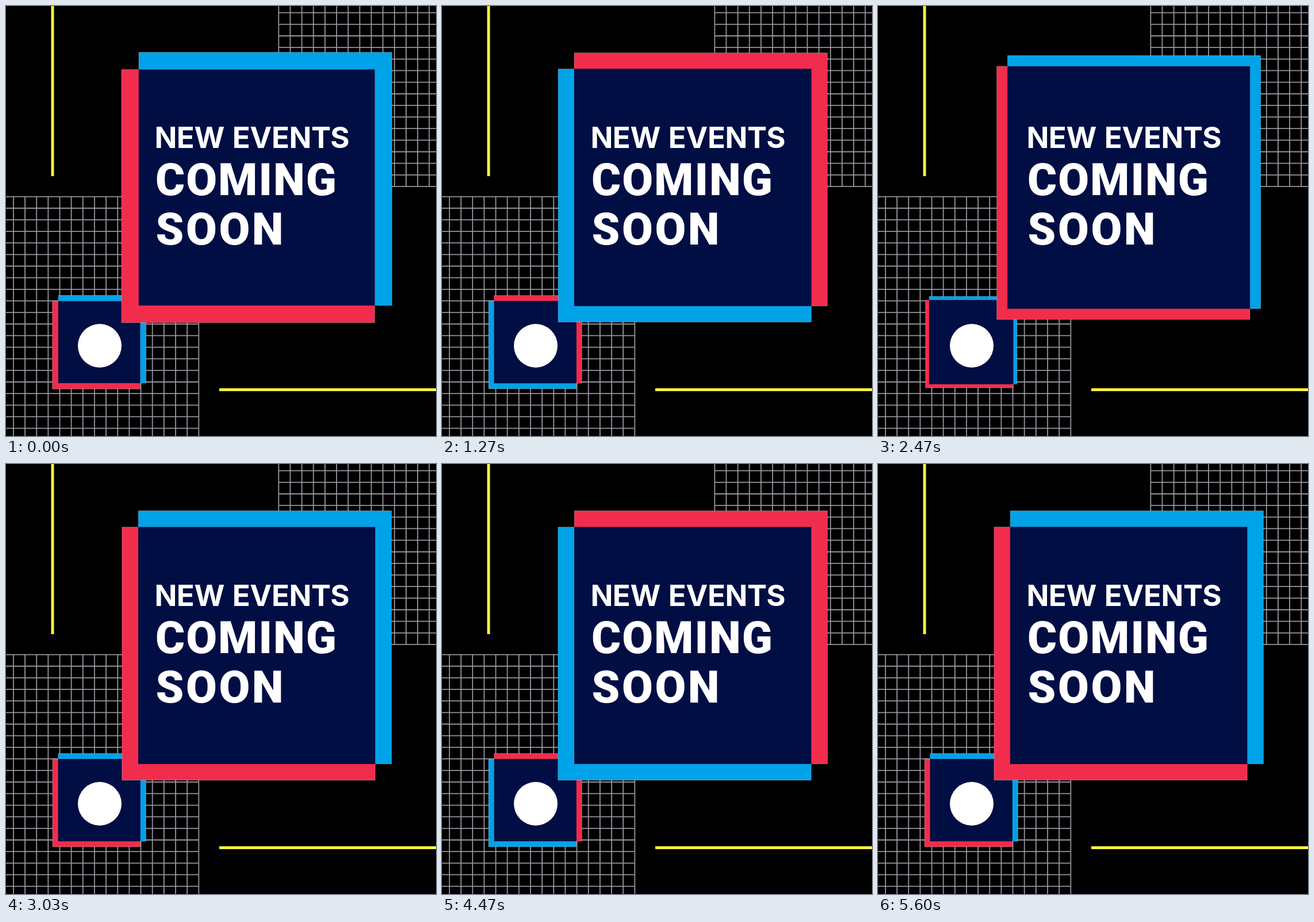
These frames come from a looping animation (748x748 px, 5660 ms). An HTML page:

```html
<!DOCTYPE html>
<html lang="en">
<head>
<meta charset="utf-8">
<title>New events coming soon</title>
<style>
  html, body { margin: 0; width: 100%; height: 100%; overflow: hidden; background: #000; }
  svg { display: block; width: 100%; height: 100%; }
  .grid { fill: none; stroke: #98939d; stroke-width: 1.8; }
  .blue, .red { stroke: #fff; stroke-opacity: .3; stroke-width: 1; }
  .blue { fill: #00a2e8; }
  .red { fill: #f22c4c; }
  .overlap { fill: #000e44; }
  .bar { fill: #fff340; }
  text { fill: #fff; }
  .small { font: 700 51px Inter, sans-serif; letter-spacing: -.4px; word-spacing: 2px; }
  .large { font: 900 78px Roboto, sans-serif; }
</style>
</head>
<body>
<svg viewBox="0 0 748 748">
  <path class="grid" id="gridTop"/>
  <path class="grid" id="gridBottom"/>
  <rect class="bar" x="78.5" y="0" width="5" height="296"/>
  <rect class="bar" x="371" y="665" width="377" height="5"/>
  <g id="smallCard"></g>
  <circle cx="163" cy="591" r="38" fill="#fff"/>
  <g id="bigCard"></g>
  <text class="small" x="258.4" y="246.5">NEW EVENTS</text>
  <text class="large" x="260" y="329" letter-spacing="2">COMING</text>
  <text class="large" x="260.5" y="415" letter-spacing="3.6">SOON</text>
</svg>
<script>
const LOOP = 5660, SWING = 2880, REACH = 15;
const CELL = 20.15;

function drawGrid(id, left, top, right, bottom, firstX, firstY) {
  let d = '';
  for (let x = firstX; x <= right + 1; x += CELL) d += `M${x} ${top}V${bottom}`;
  for (let y = firstY; y <= bottom + 1; y += CELL) d += `M${left} ${y}H${right}`;
  document.getElementById(id).setAttribute('d', d);
}
drawGrid('gridTop', 473.5, 0, 748, 314.5, 474.3, 11.7);
drawGrid('gridBottom', 0, 331, 335.5, 748, 12.9, 331.6);

function makeCard(id, cx, cy, size) {
  const group = document.getElementById(id);
  const [blue, red, overlap] = ['blue', 'red', 'overlap'].map(name => {
    const rect = document.createElementNS('http://www.w3.org/2000/svg', 'rect');
    rect.setAttribute('class', name);
    return group.appendChild(rect);
  });
  const place = (rect, x, y, side) => {
    const box = { x: x - side / 2, y: y - side / 2, width: side, height: side };
    for (const key in box) rect.setAttribute(key, box[key]);
  };
  return shift => {
    place(blue, cx + shift, cy - shift, size);
    place(red, cx - shift, cy + shift, size);
    place(overlap, cx, cy, size - 2 * Math.abs(shift) + .6);
  };
}
const moveBig = makeCard('bigCard', 436.2, 315.7, 440.2);
const moveSmall = makeCard('smallCard', 162.2, 584.7, 152.5);

// Poses change at 12.5 per second, snapped to a 30 per second clock.
const poseStarts = Array.from({ length: 71 },
  (_, i) => Math.round(Math.round(i * 2.4) * 10 / 3) * 10);

function render(time) {
  const pose = poseStarts.findLast(start => start <= time);
  const shift = REACH * Math.cos(2 * Math.PI * pose / SWING);
  moveBig(shift);
  moveSmall(shift * .345);
}

const begin = performance.now();
function tick() {
  render(Math.max(0, performance.now() - begin) % LOOP);
  requestAnimationFrame(tick);
}
tick();
</script>
</body>
</html>
```
